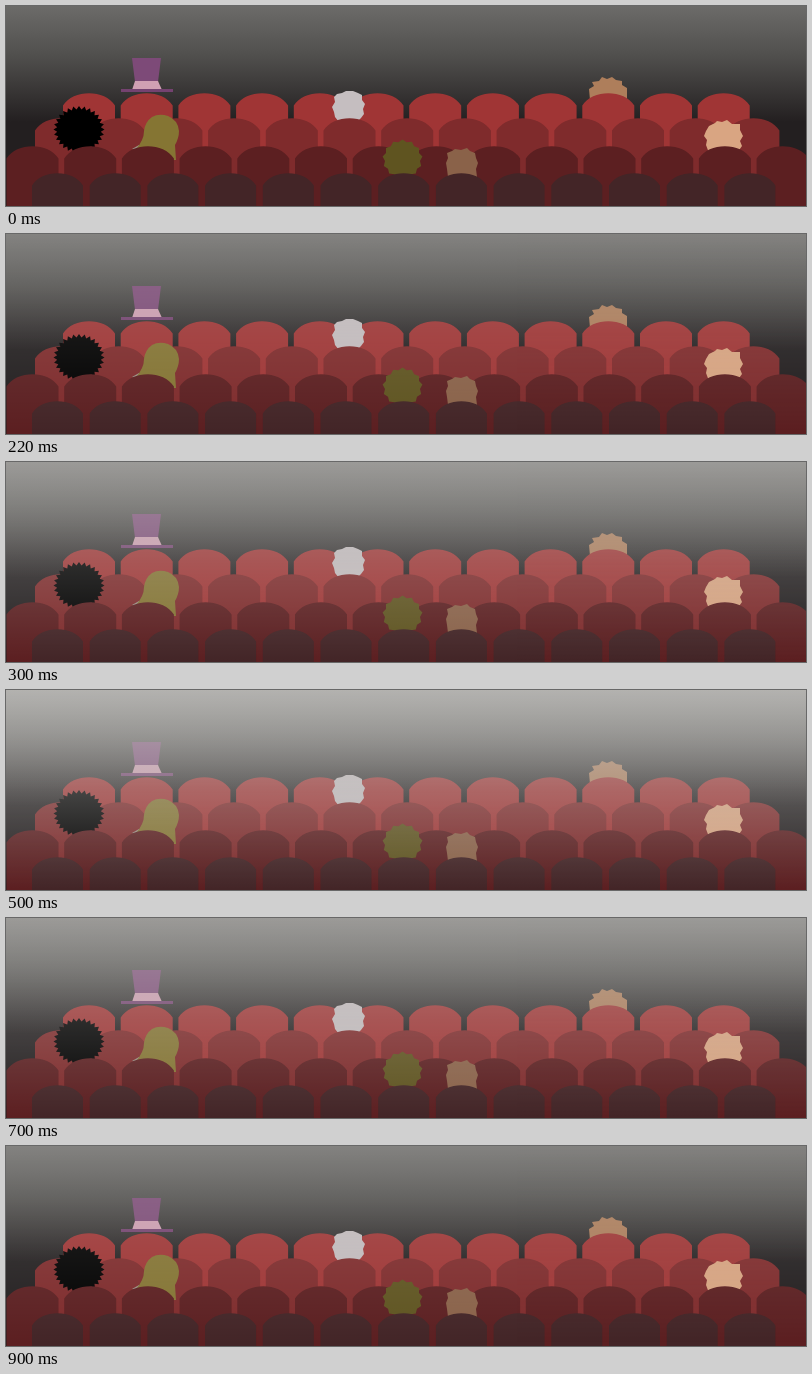
These frames come from a looping animation (800x200 px, 1100 ms). An HTML page:

```html
<!DOCTYPE html>
<html lang="en">
<head>
<meta charset="utf-8">
<title>Cinema seats</title>
<style>
  html, body { margin: 0; width: 100%; height: 100%; overflow: hidden; background: #231f20; }
  #stage { position: absolute; left: 0; top: 0; width: 800px; height: 200px; overflow: hidden; }
  svg { display: block; }
  #light {
    position: absolute; inset: 0; opacity: 0;
    background: linear-gradient(rgba(197, 196, 193, .8), rgba(197, 196, 193, .35) 50%, rgba(197, 196, 193, 0));
    animation: glow 1100ms step-end infinite;
  }
  @keyframes glow {
    0% { opacity: 0; }
    9.0909% { opacity: .333; }
    27.2727% { opacity: .667; }
    45.4545% { opacity: 1; }
    63.6364% { opacity: .667; }
    81.8182% { opacity: .333; }
    100% { opacity: 0; }
  }
</style>
</head>
<body>
<div id="stage">
  <svg width="800" height="200" viewBox="0 0 800 200">
    <defs>
      <linearGradient id="wall" x1="0" y1="0" x2="0" y2="1">
        <stop offset="0" stop-color="#6c6b69"/>
        <stop offset=".25" stop-color="#504f4d"/>
        <stop offset=".58" stop-color="#231f20"/>
      </linearGradient>
    </defs>
    <rect width="800" height="200" fill="url(#wall)"/>

    <path fill="#7d4a78" d="M126 52H155L152 76H129Z"/>
    <path fill="#d0a0b3" d="M129 75H152L156 84H126Z"/>
    <path fill="#744270" d="M115 83H167V86H115Z"/>
    <path fill="#ae7e5b" d="M583 83L588 80L586 76L593 75L596 71L601 73L606 71L610 74L616 75L616 79L621 82L621 94H584Z"/>
    <g id="row1"></g>

    <path fill="#c5bec0" d="M331 88L336 87L340 85L347 85L352 87L356 89L356 94L359 98L357 103L358 108L355 112L351 116H333L329 111L328 106L326 101L329 96L328 91Z"/>
    <g id="row2"></g>

    <path id="afro" fill="#000"/>
    <path fill="#9a8f85" d="M126 143L133 139L135 146Z"/>
    <path fill="#857533" d="M146 111Q153 107 162 110Q172 114 173 125Q173 132 169 139L170 154H134L130 143Q138 134 138 125Q139 116 146 111Z"/>
    <path fill="#d9a582" d="M703 120L709 117L711 115L716 116L721 114L726 118L734 118L734 124L737 130L734 135L736 140L731 147H703L700 139L701 134L698 130L700 125Z"/>
    <g id="row3"></g>

    <path id="curls" fill="#5f5420"/>
    <path fill="#8a6249" d="M441 147L446 145L449 143L455 144L461 142L464 145L469 147L470 152L472 157L470 163L471 171H442L441 163L440 157L442 152Z"/>
    <g id="row4"></g>
  </svg>
  <div id="light"></div>
</div>
<script>
  const $ = id => document.getElementById(id);
  const PITCH = 57.7;

  function seats(id, x, top, count, half, color) {
    let d = '';
    for (let i = 0; i < count; i++) {
      const c = x + i * PITCH, l = c - half, r = c + half, y = top + 12.5;
      d += `M${l} 202V${y}C${c - 16} ${top - 4} ${c + 16} ${top - 4} ${r} ${y}V202Z`;
    }
    $(id).innerHTML = `<path fill="${color}" d="${d}"/>`;
  }

  function spikes(id, x, y, rx, ry, count, depth) {
    const pts = [];
    for (let i = 0; i < count * 2; i++) {
      const a = i * Math.PI / count - Math.PI / 2;
      const k = i % 2 ? 1 - depth : 1;
      pts.push((x + rx * k * Math.cos(a)).toFixed(1) + ' ' + (y + ry * k * Math.sin(a)).toFixed(1));
    }
    $(id).setAttribute('d', 'M' + pts.join('L') + 'Z');
  }

  seats('row1', 83, 87, 12, 26, '#a03535');
  seats('row2', 55, 112, 13, 26, '#7f2b2c');
  seats('row3', 26.5, 140, 14, 26, '#5c1f21');
  seats('row4', 51.5, 167, 13, 25.5, '#432527');
  spikes('afro', 73, 123.5, 25.5, 23.5, 28, .14);
  spikes('curls', 396.5, 153, 20, 19.5, 13, .12);
</script>
</body>
</html>
```
